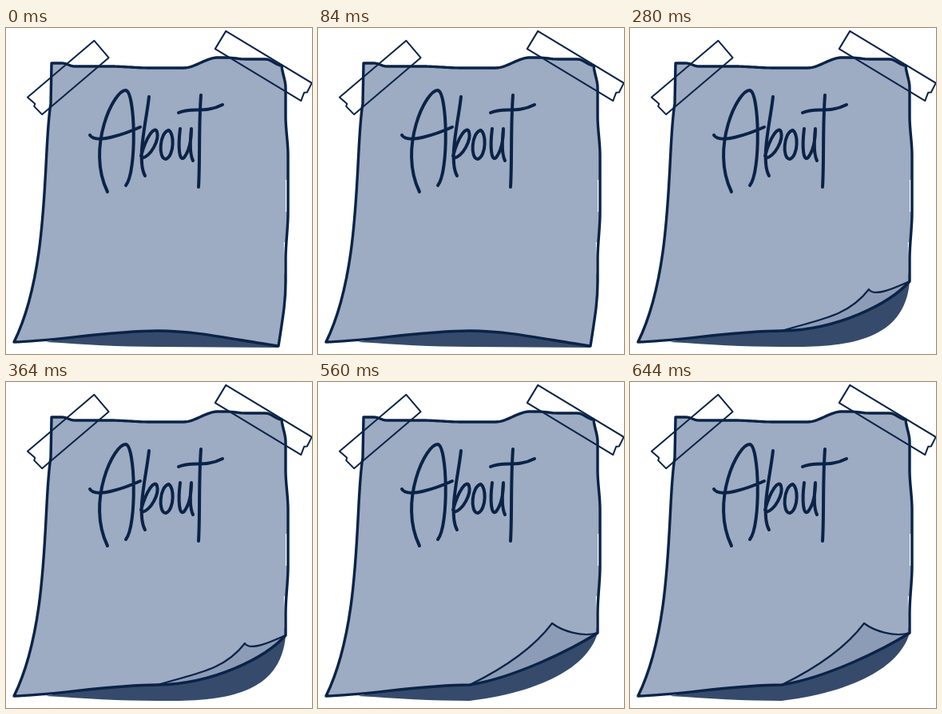
An HTML page with a canvas for the animation above (0.7 s loop, 383 px wide and 408 px high).

```html
<!DOCTYPE html>
<html lang="en">
<head>
<meta charset="utf-8">
<title>About note</title>
<style>
  html, body { margin: 0; width: 100%; height: 100%; overflow: hidden; background: #fff; }
  canvas { display: block; }
</style>
</head>
<body>
<canvas id="stage" width="383" height="408" role="img" aria-label="About"></canvas>
<script>
const ctx = document.getElementById('stage').getContext('2d');
const INK = '#0a2347', PAPER = '#9dabc3', FLAP = '#8d9cb6', SHADE = '#364b6c';
const POSE_MS = 140;

const HEM = 'C130 379 60 392 10 393';
const SHADOW_HEM = 'C140 399 100 396 50 393L100 382L190 376Z';

// Handwritten "About", one pen stroke per piece
const LETTERS = new Path2D(
  'M127 205C100 150 135 77 150 78C162 80 164 180 150 197' +
  'M105 134C112 146 150 132 168 124' +
  'M179 86C176 115 163 165 174 185' +
  'M169 160C176 135 186 122 189 130C192 140 182 160 170 163' +
  'M204 128C192 130 190 164 200 164C211 160 211 130 203 128' +
  'M218 126C215 150 217 168 223 162C229 154 232 140 232 126C230 145 231 160 234 166' +
  'M244 84C241 125 243 165 241 199' +
  'M216 106C232 99 250 107 271 96');

function smooth(from, to, v) {
  const t = Math.min(1, Math.max(0, (v - from) / (to - from)));
  return t * t * (3 - 2 * t);
}

const topY = x => 44 + 4 * smooth(70, 86, x) + 2 * smooth(130, 180, x)
  - 13 * smooth(222, 265, x) + 2 * smooth(275, 300, x) + 8 * smooth(325, 345, x);
const rightX = y => 345 + 5 * smooth(45, 75, y) + 3 * smooth(110, 160, y)
  - 3 * smooth(230, 290, y);

// Top and right sides, down to where the loose corner begins
function fixedSides() {
  let d = 'M57 44';
  for (let x = 60; x <= 345; x += 3) d += `L${x} ${topY(x)}`;
  for (let y = 48; y <= 312; y += 3) d += `L${rightX(y)} ${y}`;
  return d;
}
const SIDES = fixedSides();

function makePose(corner, edge, shadow, flap, fold) {
  const sheet = `${SIDES}L${corner}${edge}${HEM}C56 300 46 150 56 95L57 44Z`;
  return {
    sheet: new Path2D(sheet),
    shadow: new Path2D(`M${corner}${shadow}${SHADOW_HEM}`),
    flap: flap && new Path2D(flap),
    fold: fold && new Path2D(fold)
  };
}

// Corner hanging down; swing pulls its foot inward and up
function hanging(swing) {
  const foot = `${341 - 9 * swing} ${398 - 15 * swing}`;
  return makePose('350 317',
    `C350 345 ${346 - 8 * swing} 365 ${foot}C290 ${391 - 12 * swing} 240 379 190 379`,
    `C${350 + 2 * swing} 347 ${346 - 4 * swing} ${365 + 10 * swing} ${341 - 10 * swing} 400L190 399`);
}

// Corner folded over; lift raises the folded tip
function curled(lift) {
  const corner = `350 ${317 - 1.5 * lift}`;
  const edge = `C${325 - 4 * lift} ${345 - 5 * lift} ${260 - 7 * lift} ${378 - 4 * lift} 190 379`;
  const shadow = `C${344 - 4 * lift} ${395 - 16 * lift} 265 ${400 - 5 * lift} 190 399`;
  const fold = `C235 ${365 - 4 * lift} 272 ${362 - 16 * lift} ${299 - 3 * lift} ${327 - 12.5 * lift}` +
    `C305 ${337 - 13 * lift} 330 ${326 - 3 * lift} ${corner}`;
  return makePose(corner, edge, shadow, `M190 379${fold}${edge}Z`, `M190 379${fold}`);
}

const poses = [hanging(0), hanging(1), curled(0), curled(1), curled(2)];

function fill(path, color) {
  ctx.fillStyle = color;
  ctx.fill(path);
}

function ink(path, width) {
  ctx.lineWidth = width;
  ctx.stroke(path);
}

// Strip between two end centres, with a torn notch in its far end
function tape(x1, y1, x2, y2, width) {
  ctx.save();
  ctx.translate(x1, y1);
  ctx.rotate(Math.atan2(y2 - y1, x2 - x1));
  const length = Math.hypot(x2 - x1, y2 - y1), h = width / 2;
  ink(new Path2D(`M0 ${-h}L${length} ${-h}l1 ${h}l-3 2L${length} ${h}L0 ${h}Z`), 2);
  ctx.restore();
}

function draw({ sheet, shadow, flap, fold }) {
  ctx.fillStyle = '#fff';
  ctx.fillRect(0, 0, 383, 408);
  ctx.lineCap = ctx.lineJoin = 'round';
  ctx.strokeStyle = INK;

  fill(shadow, SHADE);
  fill(sheet, PAPER);
  if (flap) fill(flap, FLAP);

  // Slivers of white left inside the right outline
  ctx.fillStyle = '#fff';
  for (const y of [190, 268]) ctx.fillRect(rightX(y) - 3, y, 2, 40);

  ink(sheet, 3.4);
  if (fold) ink(fold, 2.2);
  tape(119.5, 26.5, 36, 97.5, 28);
  tape(268.5, 15, 376, 80, 26);
  ink(LETTERS, 4);
}

function tick() {
  draw(poses[Math.floor(performance.now() / POSE_MS) % poses.length]);
  requestAnimationFrame(tick);
}
tick();
</script>
</body>
</html>
```
